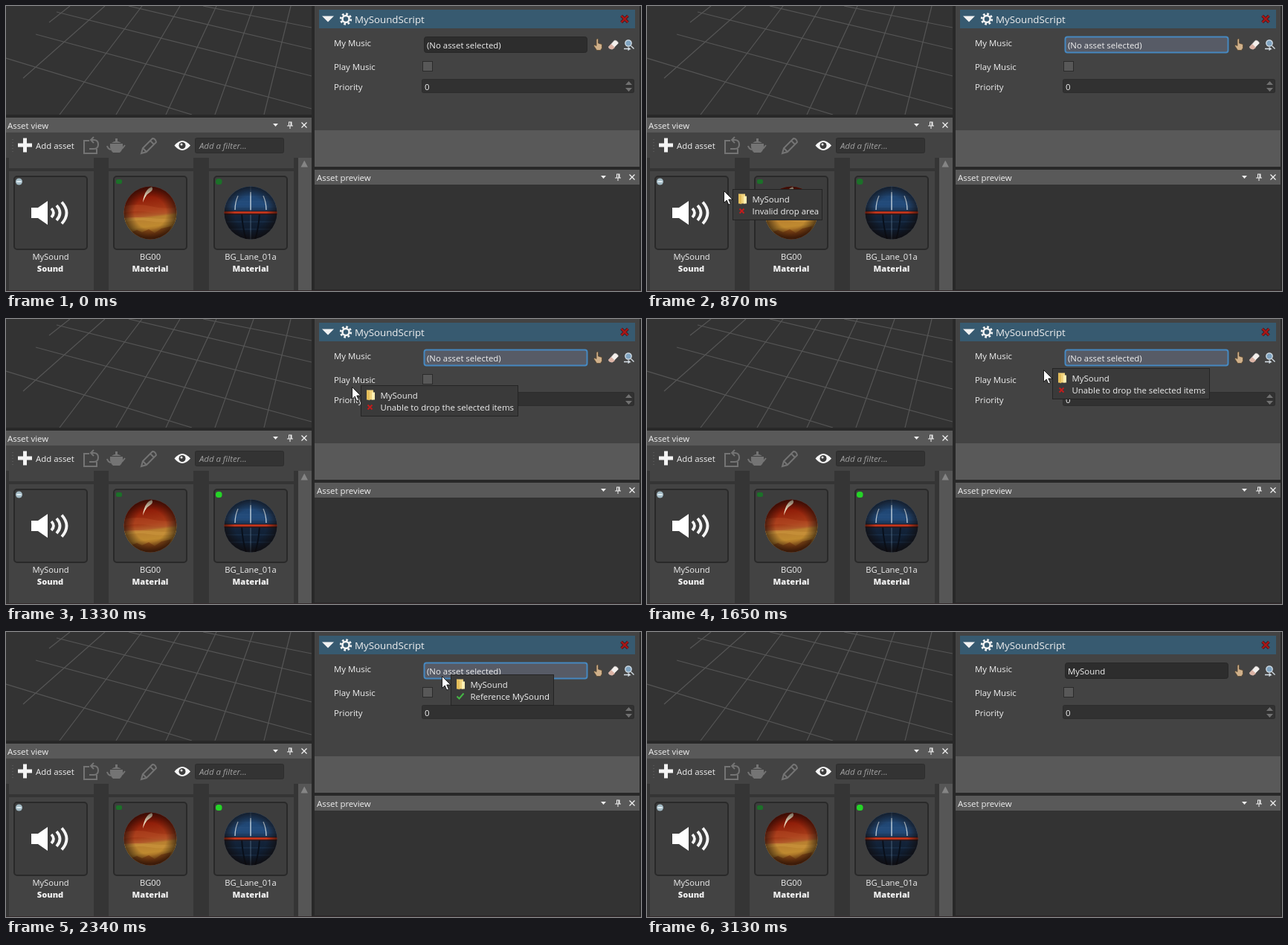
An HTML page for the animation above (3590 ms loop, 854x383 px).

```html
<!DOCTYPE html>
<html lang="en">
<head>
<meta charset="utf-8">
<title>Drag an asset onto a property</title>
<style>
  html, body { margin: 0; width: 100%; height: 100%; overflow: hidden; background: #282828; }
  svg { display: block; }
  text { font: 11.4px "Open Sans", "Noto Sans", sans-serif; fill: #f0f0f0; white-space: pre; }
  .name, .kind { text-anchor: middle; }
  .name { font-size: 11.2px; }
  .kind { font-weight: 800; font-size: 11.1px; }
  .line { fill: none; stroke: #f4f4f4; }
  .dim { fill: none; stroke: #747474; stroke-width: 2; }
  .thumb { fill: #3d3d3d; stroke: #292929; stroke-width: 2; }
  .hidden { display: none; }
  #tile.hover { fill: #5c5c5c; }
  #thumb.hover { fill: #555; }
  #badge.hover { fill: #70c4e4; }
  #field { fill: #2d2d2d; stroke: #272727; }
  #field.lit { fill: #575b66; stroke: #4688c0; stroke-width: 2; }
  #laneBadge { fill: #1c7029; }
  #laneBadge.bright { fill: #25d427; }
</style>
</head>
<body>
<svg width="854" height="383" viewBox="0 0 854 383">
  <defs>
    <linearGradient id="sunset" x2=".12" y2="1">
      <stop offset="0" stop-color="#650d04"/>
      <stop offset=".25" stop-color="#8f1c08"/>
      <stop offset=".5" stop-color="#a43a18"/>
      <stop offset=".6" stop-color="#b15a2a"/>
      <stop offset=".64" stop-color="#b98030"/>
      <stop offset=".8" stop-color="#bf8a30"/>
      <stop offset="1" stop-color="#713610"/>
    </linearGradient>
    <linearGradient id="night" x2="0" y2="1">
      <stop offset="0" stop-color="#1a3d66"/>
      <stop offset=".35" stop-color="#234c7c"/>
      <stop offset=".55" stop-color="#13243a"/>
      <stop offset="1" stop-color="#0c1626"/>
    </linearGradient>
    <radialGradient id="shade">
      <stop offset=".6" stop-color="#100804" stop-opacity="0"/>
      <stop offset="1" stop-color="#100804" stop-opacity=".6"/>
    </radialGradient>
    <clipPath id="ball"><circle r="35.5"/></clipPath>
    <clipPath id="view"><path d="M0 0h411v146H0z"/></clipPath>
    <g id="paneButtons">
      <path d="M-42-2h7l-3.500 4z" fill="#eee"/>
      <path d="M-21-4.500h4.500v5h1.500v1h-3.500v3.500h-1V1.500H-23v-1h2z" fill="#f0f0f0"/>
      <path d="M-20-3.500h1.500v4H-20z" fill="#595959"/>
      <path class="line" d="M-3.500-3.500l7 7M3.500-3.500l-7 7" stroke-width="1.200"/>
    </g>
    <path id="cross" d="M-4-4L4 4M4-4L-4 4" fill="none"/>
  </defs>

  <!-- Scene view -->
  <path d="M0 0h411v146H0z" fill="#333"/>
  <g id="grid" clip-path="url(#view)" fill="none" stroke="#555" stroke-width="1.200"></g>

  <!-- Asset view -->
  <path d="M0 150h411v20H0z" fill="#595959"/>
  <text x="2" y="165">Asset view</text>
  <use href="#paneButtons" x="401" y="160"/>
  <path d="M0 170h411v34H0z" fill="#434343"/>
  <path d="M9 179v18" stroke="#555" stroke-width="2" stroke-dasharray="1 3"/>
  <path class="line" d="M16 187h19M25.500 177.500v19" stroke-width="5"/>
  <text x="40" y="192">Add asset</text>
  <path class="dim" d="M112 181h-7v17h17v-6M112 192h6q6 0 6-6t-6-6h-4M118 176l-4 4 4 4"/>
  <g fill="#747474">
    <path d="M140 185h17q1 8-4 12h-9q-5-4-4-12zM142 184q6-5 13 0zM147 178h3v4h-3z"/>
    <path class="dim" d="M141 193q-4-1-5-5M156 192l4-5"/>
  </g>
  <path class="dim" d="M182 198l2-7 13-13q4 0 5 5l-13 13zM194 181l5 5M184 191l5 5"/>
  <path d="M226.500 187.500q10.500-13 21.500 0-11 13-21.500 0z" fill="#f6f6f6"/>
  <circle cx="237" cy="187.500" r="4.500" fill="#3d3d3d"/>
  <circle cx="236" cy="186" r="1.500" fill="#f6f6f6"/>
  <rect x="254.500" y="177.500" width="119" height="20" rx="2" fill="#333" stroke="#2d2d2d"/>
  <text x="260" y="192" style="font-style:italic;fill:#a0a0a0">Add a filter...</text>

  <path d="M0 204h411v179H0z" fill="#353535"/>
  <path d="M4 204h114v14H4zM138 204h114v14H138zM273 204h114v14H273zM138 222h114v160H138zM273 222h114v160H273z" fill="#434343"/>
  <path id="tile" d="M4 222h114v160H4z" fill="#434343"/>
  <path d="M393 204h18v179h-18z" fill="#565656"/>
  <path d="M396.500 216.500h9.500l-4.750-9z" fill="#858585"/>

  <rect id="thumb" class="thumb" x="11" y="229" width="98" height="98" rx="4"/>
  <rect class="thumb" x="145" y="229" width="98" height="98" rx="4"/>
  <rect class="thumb" x="280" y="229" width="98" height="98" rx="4"/>

  <path d="M34 271h9l13-9v32l-13-9h-9z" fill="#fff"/>
  <path class="line" stroke-width="3.800" d="M61 272q6 6 0 12M68 268q9 10 0 20M75 263.500q13 14.500 0 29"/>
  <circle id="badge" cx="17.500" cy="236" r="4.500" fill="#a3bac4"/>
  <path d="M14.500 236h6" stroke="#e0edf2" stroke-width="2"/>

  <g transform="translate(194 278)" clip-path="url(#ball)">
    <path d="M-36-36h72v72h-72z" fill="url(#sunset)"/>
    <path d="M-36-9q20-4 36 0t36 2v5q-22 4-38 1t-34 1z" fill="#b9522a" opacity=".4"/>
    <path d="M-36 7q17-2 36 0t36 0v4q-20 3-38 0t-34 2z" fill="#cf9a40" opacity=".5"/>
    <path d="M-28 27l10-4 7 3 9-4 8 5 9-6 13-3-8 20h-40z" fill="#74300d" opacity=".55"/>
    <path d="M2-35q-10 3-12 21 3-10 10-14 5-3 2-7z" fill="#f5e5c8"/>
    <circle r="35.500" fill="url(#shade)"/>
  </g>
  <rect x="148" y="233" width="8" height="6" rx="2" fill="#1c7029"/>

  <g transform="translate(329 278)" clip-path="url(#ball)">
    <path d="M-36-36h72v72h-72z" fill="url(#night)"/>
    <path d="M-34-15h68M-35-8h70M-30-22h60M-32 12h64M-28 22h56" stroke="#35608a" opacity=".35"/>
    <path d="M-12 0q1 20 6 36M12 0q-1 20-6 36" fill="none" stroke="#080f1a" stroke-width="2"/>
    <path d="M0-36V36" stroke="#6f8ba5" opacity=".6"/>
    <path d="M0-28V-4M-17-23q-4 9-4 19M17-23q4 9 4 19" fill="none" stroke="#c3d2de" stroke-width="1.300"/>
    <path d="M-36 0h72" stroke="#301719" stroke-width="5"/>
    <path d="M-36-.5h72" stroke="#cf381d" stroke-width="2.600"/>
    <circle r="35.500" fill="url(#shade)"/>
  </g>
  <rect id="laneBadge" x="282" y="232" width="8.500" height="8" rx="3.500"/>

  <text class="name" x="60" y="341">MySound</text><text class="kind" x="59.500" y="357">Sound</text>
  <text class="name" x="194" y="341">BG00</text><text class="kind" x="194" y="357">Material</text>
  <text class="name" x="329" y="341">BG_Lane_01a</text><text class="kind" x="329" y="357">Material</text>

  <!-- Property grid -->
  <path d="M415 0h437v167H415z" fill="#434343"/>
  <path d="M415 167h437v49H415z" fill="#595959"/>
  <path id="row" class="hidden" d="M415 36h437v32H415z" fill="#4f4f4f"/>
  <path d="M421 5h425v25H421z" fill="#375a70"/>
  <path d="M425 13.500h16l-8 8z" fill="#f2f2f2"/>
  <circle class="line" cx="457" cy="17.500" r="4.500" stroke-width="2.500"/>
  <circle class="line" cx="457" cy="17.500" r="6.800" stroke-width="2.800" stroke-dasharray="2.670"/>
  <text x="469" y="23" style="font-size:13.3px">MySoundScript</text>
  <use href="#cross" transform="translate(832 17.500) scale(1.100)" stroke="#351c20" stroke-width="3.600"/>
  <use href="#cross" transform="translate(832 17.500) scale(1.100)" stroke="#a91616" stroke-width="2.200"/>

  <text x="441" y="54">My Music</text>
  <text x="441" y="86">Play Music</text>
  <text x="441" y="113">Priority</text>
  <rect id="field" x="562.500" y="41.500" width="219" height="21" rx="3"/>
  <text id="value" x="566" y="57"></text>
  <rect x="560.500" y="74.500" width="13" height="13" fill="#585858" stroke="#2b2b2b"/>
  <rect x="559.500" y="98.500" width="285" height="18" rx="2" fill="#313131" stroke="#2d2d2d"/>
  <text x="563" y="113">0</text>
  <path d="M833 106l4.500-5 4.500 5zM833 110h9l-4.500 5z" fill="#717171"/>

  <path d="M794 45q1.500-2 2.500 0v5l5 1.500v5l-2 3h-5l-4-6q1-2 3.500 0z" fill="#cfb08a" stroke="#59462e" stroke-width=".8"/>
  <path d="M810 55l8-9q2-1 5 2l1 2-8 8q-4 1-6-3z" fill="#f3efec" stroke="#555" stroke-width=".6"/>
  <path d="M810 55l4-4 5 5-3 2q-4 1-6-3z" fill="#dbb3a5"/>
  <circle cx="837" cy="50" r="4.200" fill="#7fa3c0" stroke="#d5e0e8" stroke-width="1.300"/>
  <path d="M840.500 53.500l4 4M831 57.500h8l-2.500-2M839 57.500l-2.500 2" fill="none" stroke="#d7e0e7" stroke-width="1.300"/>
  <text id="hint" class="hidden" x="419" y="184" style="font-weight:700">My Music</text>

  <!-- Asset preview -->
  <path d="M415 220h437v20H415z" fill="#595959"/>
  <text x="418" y="235">Asset preview</text>
  <use href="#paneButtons" x="842" y="230"/>
  <path d="M415 240h437v141H415z" fill="#333"/>
  <path d="M0 382.500h854" stroke="#352b2d"/>

  <!-- Pointer and drag tooltip -->
  <g id="pointer">
    <g id="tip" transform="translate(12.500 -1.500)">
      <rect id="tipBox" height="41" fill="#3a3a3a" stroke="#242424"/>
      <path d="M7.500 6h9v13h-9z" fill="#f0d27c"/>
      <path d="M14.500 9h4v10h-4z" fill="#fff0b5"/>
      <path d="M7.500 6l4 2v12l-4-2z" fill="#e4bd59"/>
      <use id="deny" href="#cross" stroke="#c21c1c" stroke-width="2.600" transform="translate(12 29) scale(.75)"/>
      <path id="allow" d="M8 29l3 3 6-7" fill="none" stroke="#45b545" stroke-width="2"/>
      <text x="26" y="17">MySound</text>
      <text id="tipText" x="26" y="33"></text>
    </g>
    <path id="arrow" d="M.5.5V16.500l3.700-3.500 2.600 6 2.600-1.100-2.600-5.900h5.200z" fill="#fff" stroke="#111" stroke-width=".9"/>
    <path id="caret" d="M-3-7.500q3 0 3 2 0-2 3-2M0-6V6M-3 7.500q3 0 3-2 0 2 3 2" fill="none" stroke="#050505" stroke-width="1.300"/>
  </g>
</svg>
<script>
const LOOP = 3590;
const DROP = 2570;

// Pointer positions: [time in ms, x, y]
const path = [
  [90, 72, 372], [170, 70, 352], [250, 66, 330], [330, 62, 310],
  [410, 59, 295], [490, 56, 284], [570, 55, 278],
  [800, 62, 274], [870, 103, 248], [950, 180, 208], [1030, 262, 166],
  [1100, 330, 135], [1180, 390, 112], [1260, 430, 98], [1330, 465, 91],
  [1420, 490, 85], [1490, 508, 79], [1570, 522, 73], [1650, 533, 68],
  [1720, 540, 65], [1800, 543, 63],
  [1880, 547, 62], [1960, 555, 60], [2050, 563, 59], [2110, 570, 59],
  [2190, 577, 59], [2260, 583, 59], [2340, 586, 59],
  [2650, 586, 59], [2730, 588, 95], [2810, 591, 160],
  [2880, 594, 230], [2960, 597, 300], [3040, 600, 361]
];

const messages = {
  invalid: ["Invalid drop area", 120],
  unable: ["Unable to drop the selected items", 211],
  accept: ["Reference MySound", 138]
};

const $ = id => document.getElementById(id);
const show = (id, on) => $(id).classList.toggle("hidden", !on);
const mark = (id, name, on) => $(id).classList.toggle(name, on);

// Floor lines: [x1, y1, x2, y2]
function drawGrid() {
  const lines = [
    [86, 0, 58, 22], [133, 0, 23, 97], [183, 0, 72, 146], [234, 0, 148, 146],
    [283, 0, 215, 146], [333, 0, 281, 146], [383, 0, 347, 146],
    [265, 0, 411, 29], [165, 0, 411, 58], [68, 8, 411, 94], [40, 38, 411, 138], [0, 70, 250, 146]
  ];
  const d = lines.map(([x1, y1, x2, y2]) => `M${x1} ${y1}L${x2} ${y2}`).join("");
  $("grid").innerHTML = `<path d="${d}"/>`;
}

function render(t) {
  const step = path.findLast(p => p[0] <= t);
  const visible = !!step && t < 3130;
  const dragging = t >= 800 && t < DROP;
  const hover = t >= 90 && t < 800;
  const overRow = t >= DROP && t < 2730;

  for (const id of ["tile", "thumb", "badge"]) mark(id, "hover", hover);
  mark("field", "lit", dragging);
  mark("laneBadge", "bright", t >= 1030);
  $("value").textContent = t < DROP ? "(No asset selected)" : "MySound";
  show("row", overRow);
  show("hint", overRow);
  show("pointer", visible);
  if (!visible) return;

  const [, x, y] = step;
  $("pointer").setAttribute("transform", `translate(${x} ${y})`);
  show("tip", dragging);
  show("arrow", !overRow);
  show("caret", overRow);

  const kind = x < 415 ? "invalid" : t < 2110 ? "unable" : "accept";
  const [message, width] = messages[kind];
  $("tipText").textContent = message;
  $("tipBox").setAttribute("width", width);
  show("deny", kind !== "accept");
  show("allow", kind === "accept");
}

drawGrid();
const start = performance.now();
function frame() {
  render((performance.now() - start) % LOOP);
  requestAnimationFrame(frame);
}
frame();
</script>
</body>
</html>
```
